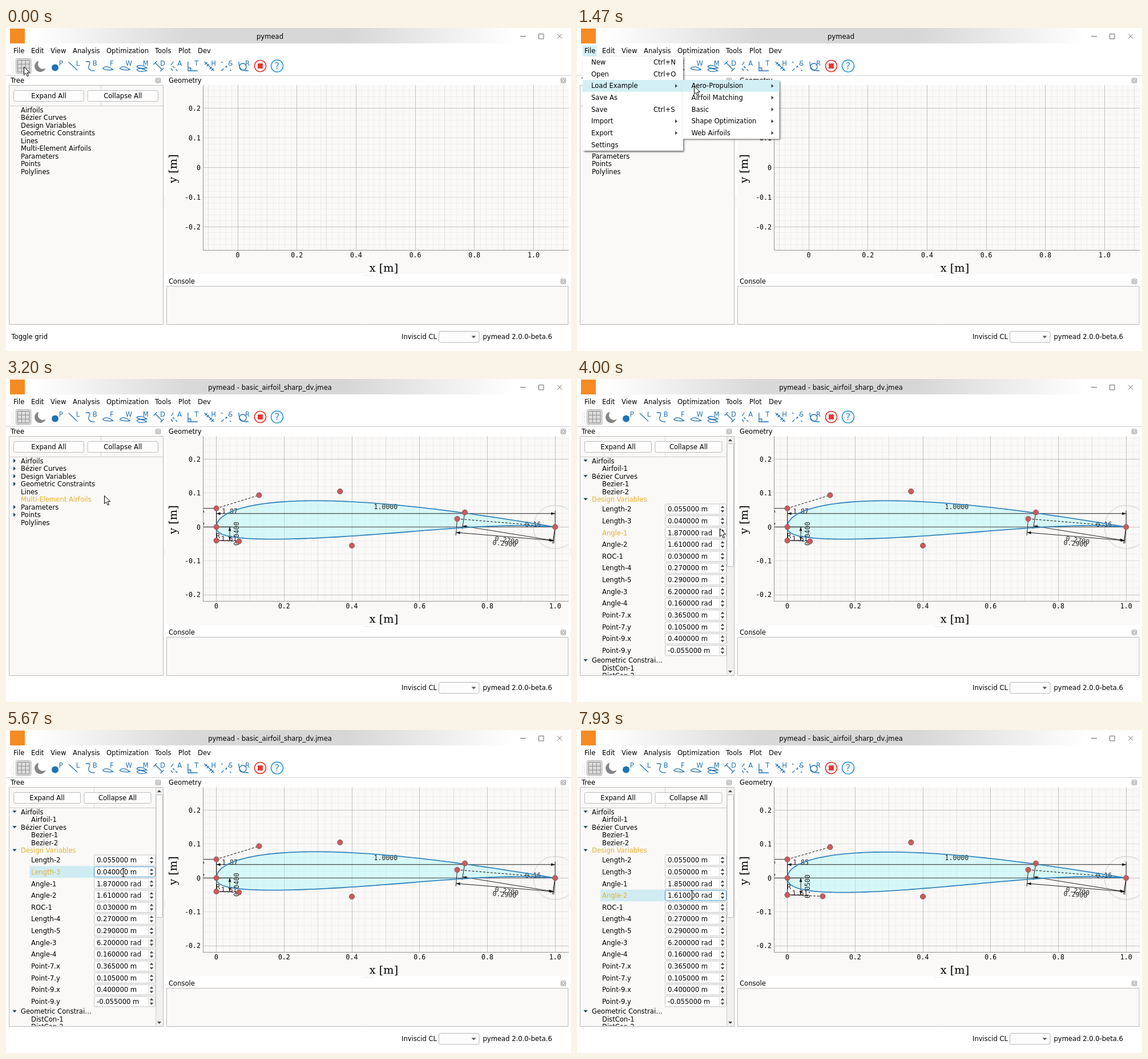
Write an HTML page with a canvas that moves like this. It is 990x566 px and loops after 8 s.

```html
<!DOCTYPE html>
<html lang="en">
<head>
<meta charset="utf-8">
<title>pymead</title>
<style>
html, body { margin: 0; width: 100%; height: 100%; overflow: hidden; background: #fff; }
canvas { display: block; }
</style>
</head>
<body>
<canvas id="c" width="990" height="566"></canvas>
<script>
const g = document.getElementById('c').getContext('2d');
const LOOP = 8000, STEP = 1000 / 15, PITCH = 20.65, ROW = 13.5;
const SANS = '11.57px "DejaVu Sans", sans-serif';
const MONO = '11.57px "DejaVu Sans Mono", monospace';
const SERIF = '19.3px "DejaVu Serif", "Noto Serif", serif';
const INK = '#000', BG = '#faf9f8', EDGE = '#b9b8b6', HOT = '#e8b02e', SEL = '#d2eff6', BLUE = '#1f72b8';

// pointer path: time, x, y
const PATH = [
  [0, 31, 68], [330, 21, 42], [470, 21, 42], [800, 46, 93], [870, 46, 92], [1000, 46, 92],
  [1270, 150, 99], [1470, 205, 102], [1730, 258, 160], [1800, 270, 157], [1870, 278, 150],
  [1930, 281, 148], [2000, 281, 160], [2200, 280, 161], [2600, 420, 163], [2670, 420, 163],
  [3000, 225, 195], [3200, 172, 204.5], [3470, 80, 119], [3540, 80, 119], [3870, 246, 258],
  [4000, 250, 262], [4400, 252, 222], [5070, 252, 222], [5200, 252, 230], [5330, 252, 230],
  [5600, 205, 250], [5734, 205, 250], [5867, 250, 243], [6467, 250, 243], [6600, 251, 252],
  [6670, 251, 252], [6870, 251, 272], [7400, 251, 272], [7600, 250, 280.5], [7867, 250, 280.5],
  [7930, 201, 289], [8000, 201, 289]
];

function pointer(t) {
  let i = 1;
  while (i < PATH.length - 1 && PATH[i][0] < t) i++;
  const a = PATH[i - 1], b = PATH[i];
  const k = Math.min(1, Math.max(0, (t - a[0]) / (b[0] - a[0])));
  const e = k * k * (3 - 2 * k);
  return { x: a[1] + (b[1] - a[1]) * e, y: a[2] + (b[2] - a[2]) * e };
}

// last value whose start time has passed
function at(t, first, ...keys) {
  let v = first;
  for (const [s, n] of keys) if (t >= s) v = n;
  return v;
}

function text(s, x, y, o = {}) {
  g.font = o.font || SANS;
  g.fillStyle = o.color || INK;
  g.textAlign = o.align || 'left';
  g.fillText(s, x, y + (o.dy ?? 4.2));
}
function line(x1, y1, x2, y2, color = INK, w = 1, dash = []) {
  g.strokeStyle = color; g.lineWidth = w; g.setLineDash(dash);
  g.beginPath(); g.moveTo(x1, y1); g.lineTo(x2, y2); g.stroke();
  g.setLineDash([]);
}
function rect(x, y, w, h, fill, stroke, r = 0) {
  g.beginPath(); g.roundRect(x, y, w, h, r);
  if (fill) { g.fillStyle = fill; g.fill(); }
  if (stroke) { g.strokeStyle = stroke; g.lineWidth = 1; g.stroke(); }
}
function poly(pts, fill) {
  g.fillStyle = fill; g.beginPath();
  pts.forEach(p => g.lineTo(p[0], p[1]));
  g.closePath(); g.fill();
}
function circle(x, y, r, fill, stroke, w = 1) {
  g.beginPath(); g.arc(x, y, r, 0, 7);
  if (fill) { g.fillStyle = fill; g.fill(); }
  if (stroke) { g.strokeStyle = stroke; g.lineWidth = w; g.stroke(); }
}
const right = (x, y, c = '#444', s = 3.3) => poly([[x - 2, y - s], [x + 2, y], [x - 2, y + s]], c);
const down = (x, y, c = '#444', s = 3.5, h = 2) => poly([[x - s, y - h], [x + s, y - h], [x, y + h]], c);
const up = (x, y, c = '#444', s = 3.5, h = 2) => poly([[x - s, y + h], [x + s, y + h], [x, y - h]], c);
function dots(x, y, nx, ny, gap = 3) {
  g.fillStyle = '#c4c4c4';
  for (let i = 0; i < nx; i++) for (let j = 0; j < ny; j++) g.fillRect(x + i * gap, y + j * gap, 1, 1);
}
function button(s, x, y, w, h) {
  rect(x, y, w, h, '#fdfdfd', '#bcbbba', 2.5);
  text(s, x + w / 2, y + h / 2, { align: 'center' });
}

function titleBar(loaded) {
  const grad = g.createLinearGradient(0, 0, 990, 0);
  [[0.05, '#fff'], [0.32, '#d9d9d9'], [0.6, '#d6d6d6'], [0.9, '#fff']].forEach(s => grad.addColorStop(...s));
  g.fillStyle = grad; g.fillRect(0, 0, 990, 27);
  rect(7, 1, 26, 26, '#f58b22');
  text(loaded ? 'pymead - basic_airfoil_sharp_dv.jmea' : 'pymead', 462.5, 14.5, { align: 'center' });
  line(901, 14.5, 911, 14.5, '#666');
  rect(933.5, 10.5, 8.5, 8.5, null, '#666');
  line(966, 10.5, 974, 18.5, '#666');
  line(974, 10.5, 966, 18.5, '#666');
}

const MENU = [['File', 13], ['Edit', 44], ['View', 78], ['Analysis', 117], ['Optimization', 176], ['Tools', 261], ['Plot', 302], ['Dev', 336]];
function menuBar(fileHot) {
  if (fileHot) rect(10, 31, 25, 18, SEL);
  MENU.forEach(m => text(m[0], m[1], 40));
}

// each icon: letter, then strokes relative to its centre
const FOIL = 'M-9 4C-6-1 2 0 9 6C2 7-4 7-9 4';
const ICONS = [
  ['P', ''], ['L', 'M-9-7L6 7'], ['B', 'M-9-8C6-10-8 0-3 5S4 7 7 8'], ['F', FOIL],
  ['W', FOIL], ['M', 'M-9 1C-6-3 2-2 9 3C2 4-4 4-9 1M-9 6C-5 3 2 3 9 8C2 10-5 10-9 6'],
  ['D', 'M-6-6L6 6M-9-3L-3-9M3 9L9 3'], ['A', 'M-8-2L-4-8M-5 0L-2 3M0 5L3 8M-8 4L-5 8'],
  ['T', 'M-8-8V8H9M-8 3H-3V8'], ['H', 'M-9-8L8 8M-8-3L-4-7M-5 0L-1-4M0 5L4 1M3 8L7 4'],
  ['S', 'M-9 8L-5 4M-2 2L1-1M3-3L5-5M-9-8L-7-6M-1 0L1 2M6 6L8 8'],
  ['R', 'M5 1A6 6 0 1 1-7 1A6 6 0 1 1 5 1M-8-8C-8 4-5 8 9 8']
];
function toolBar() {
  dots(9, 59, 2, 7);
  rect(17.5, 53.5, 26.5, 26.5, '#dedddd', '#b5b4b4', 2.5);
  rect(20.5, 56.5, 20.5, 20.5, null, '#858585');
  for (const d of [6.8, 13.7]) {
    line(20.5 + d, 56.5, 20.5 + d, 77, '#8d8d8d');
    line(20.5, 56.5 + d, 41, 56.5 + d, '#8d8d8d');
  }
  g.fillStyle = '#858585'; g.beginPath();
  g.arc(60, 67, 10, -1.9, 0.35, true);
  g.arc(64.5, 63.5, 8.4, 0.9, -2.75);
  g.fill();
  circle(86, 69.5, 6, BLUE);
  ICONS.forEach(([s, d], i) => {
    const x = 89.3 + i * 29.7;
    text(s, x + 7, 61.5, { color: BLUE, align: 'center' });
    g.save(); g.translate(x, 67);
    g.strokeStyle = BLUE; g.lineWidth = 1.3; g.stroke(new Path2D(d));
    g.restore();
  });
  circle(445.5, 66.5, 10, '#fff', '#e23b35', 1.6);
  rect(441, 62, 9, 9, '#e23b35', null, 1);
  circle(475, 66.5, 10.5, '#fff', '#2590d6', 1.5);
  text('?', 475, 66.5, { align: 'center', color: '#2590d6', font: '16px "DejaVu Sans", sans-serif', dy: 5.8 });
  line(0, 83.5, 990, 83.5, '#cfcecd');
}

function dock(s, x, y, bx) {
  text(s, x, y);
  rect(bx + 0.5, y - 4, 8, 8, null, '#8c8c8c', 1);
  rect(bx + 2.5, y - 1.5, 4, 3.5, null, '#8c8c8c');
}

const GROUPS = ['Airfoils', 'Bézier Curves', 'Design Variables', 'Geometric Constraints', 'Lines', 'Multi-Element Airfoils', 'Parameters', 'Points', 'Polylines'];
const ARROWED = [0, 1, 2, 3, 6, 7];

function collapsed(loaded, p) {
  line(166.5, 101, 166.5, 136, '#d4d3d2');
  line(5, 136.5, 275, 136.5, '#cccbca');
  button('Expand All', 13.5, 109.5, 123, 19);
  button('Collapse All', 143, 109.5, 123.5, 19);
  const hover = loaded && p.x < 275 ? Math.floor((p.y - 136.2) / ROW) : -1;
  GROUPS.forEach((s, i) => {
    const y = 143.3 + i * ROW;
    if (loaded && ARROWED.includes(i)) right(15, y, '#0f4560', 3.6);
    text(s, 26, y, { color: i === hover ? HOT : INK });
  });
}

function variables(t) {
  const f = (v, u = 'm') => v.toFixed(6) + ' ' + u;
  const s = shape(t);
  return [
    ['Length-2', f(s.l2)], ['Length-3', f(s.l3)], ['Angle-1', f(s.a1, 'rad')], ['Angle-2', f(1.61, 'rad')],
    ['ROC-1', f(0.03)], ['Length-4', f(0.27)], ['Length-5', f(0.29)], ['Angle-3', f(6.2, 'rad')],
    ['Angle-4', f(0.16, 'rad')], ['Point-7.x', f(0.365)], ['Point-7.y', f(0.105)], ['Point-9.x', f(0.4)], ['Point-9.y', f(-0.055)]
  ];
}

function expanded(t, p) {
  const group = (s, y, c) => { down(15, y, '#0f4560', 3.6); text(s, 26, y, { color: c }); };
  const focus = at(t, -1, [4470, 0], [5660, 1], [7000, 2], [7730, 3]);
  const hover = p.x < 262 ? Math.floor((p.y - 217.7) / PITCH) : -1;
  line(154.5, 101, 154.5, 136, '#d4d3d2');
  line(5, 136.5, 262, 136.5, '#cccbca');
  button('Expand All', 13.5, 109.5, 117, 19);
  button('Collapse All', 137, 109.5, 117, 19);
  g.save();
  g.beginPath(); g.rect(6, 101, 269, 417.5); g.clip();
  group('Airfoils', 143.3);
  text('Airfoil-1', 44, 156.8);
  group('Bézier Curves', 170.3);
  text('Bezier-1', 44, 183.8);
  text('Bezier-2', 44, 197.3);
  group('Design Variables', 210.8, HOT);
  variables(t).forEach(([s, v], i) => {
    const y = 228 + i * PITCH, on = i === focus;
    if (on) rect(41, y - 10.3, 114, PITCH, '#d0ecf3');
    text(s, 44, y, { color: on || i === hover ? HOT : INK });
    rect(154.5, y - 9, 107, 18, '#fff', on ? '#3b8fca' : '#c3c2c1', 2);
    line(249.5, y - 8, 249.5, y + 8, '#dcdbda');
    text(v, 159, y);
    up(255, y - 4, '#4a4a4a', 3.4);
    down(255, y + 4, '#4a4a4a', 3.4);
  });
  group('Geometric Constrai…', 493);
  text('DistCon-1', 44, 506.5);
  text('DistCon-2', 44, 520);
  rect(262.5, 101, 12, 418, '#f1f0ef');
  line(262.5, 101, 262.5, 519, '#cfcecd');
  rect(263, 113.5, 11.5, 215, '#fbfafa', '#bdbcbb', 1);
  up(268.5, 107); down(268.5, 513);
  g.restore();
}

function tree(t, p) {
  dock('Tree', 8, 92, 262);
  rect(5.5, 100.5, 270, 419, BG, EDGE);
  if (t >= 3530) expanded(t, p); else collapsed(t >= 2670, p);
}

function shape(t) {
  return {
    l2: at(t, 0.055, [4860, 0.065], [5060, 0.075], [5190, 0.065], [5330, 0.055]),
    l3: at(t, 0.04, [5930, 0.05], [6190, 0.06], [6600, 0.05]),
    a1: at(t, 1.87, [7060, 1.86], [7395, 1.85])
  };
}

// distance dimension drawn at an offset to the left-hand side of a-b on screen
function dim(a, b, off, s) {
  const dx = b[0] - a[0], dy = b[1] - a[1], n = Math.hypot(dx, dy);
  const ux = dx / n, uy = dy / n, nx = -uy, ny = ux;
  const move = (p, d) => [p[0] + nx * d, p[1] + ny * d];
  const c = move(a, off), d = move(b, off), ext = off * 1.22;
  line(...a, ...move(a, ext), '#222'); line(...b, ...move(b, ext), '#222');
  line(...c, ...d, '#222');
  for (const [q, k] of [[c, 1], [d, -1]]) {
    const bx = q[0] + ux * 7 * k, by = q[1] + uy * 7 * k;
    poly([q, [bx + nx * 2.4, by + ny * 2.4], [bx - nx * 2.4, by - ny * 2.4]], '#111');
  }
  const m = move([(a[0] + b[0]) / 2, (a[1] + b[1]) / 2], off + 12 * Math.sign(off));
  g.save(); g.translate(...m); g.rotate(Math.atan2(dy, dx));
  text(s, 0, 0, { font: MONO, align: 'center', color: '#222' });
  g.restore();
}

function bezier(P) {
  const out = [];
  for (let i = 0; i <= 90; i++) {
    let q = P;
    const u = i / 90;
    while (q.length > 1) q = q.slice(1).map((b, j) => [0, 1].map(k => q[j][k] * (1 - u) + b[k] * u));
    out.push(q[0]);
  }
  return out;
}

function airfoil(t, X, Y) {
  const { l2, l3, a1 } = shape(t), TE = 2 * Math.PI - 6.2;
  const side = (l, ang, sg, far, near) => {
    const x = l * l / 0.03 * 1.25;
    return [[0, 0], [0, sg * l], [x, sg * (l + x * Math.tan(ang - Math.PI / 2))], far, near, [1, 0]].map(p => [X(p[0]), Y(p[1])]);
  };
  const U = side(l2, a1, 1, [0.365, 0.105], [1 - 0.27 * Math.cos(0.16), 0.27 * Math.sin(0.16)]);
  const L = side(l3, 1.61, -1, [0.4, -0.055], [1 - 0.29 * Math.cos(TE), 0.29 * Math.sin(TE)]);
  const cu = bezier(U), cl = bezier(L), O = U[0], E = U[5];

  poly([...cu, ...cl.slice().reverse()], 'rgba(170,245,245,0.45)');
  circle(...E, 38, null, '#c9c9c9', 0.9);
  line(...O, ...E, '#444');
  line(...U[1], ...L[1], '#333', 1.2);
  line(...U[1], ...U[2], '#111', 1, [4, 2.5]);
  line(...L[1], ...L[2], '#111', 1, [4, 2.5]);
  line(...L[4], ...E, '#111', 1, [4, 2.5]);
  dim(O, E, -23.5, '1.0000');
  dim(O, U[1], -23.5, l2.toFixed(4));
  dim(L[1], O, 23.5, l3.toFixed(4));
  dim(U[4], E, 24, '0.2700');
  dim(L[4], E, 24, '0.2900');
  const mid = { font: MONO, align: 'center', color: '#222' };
  text(a1.toFixed(2), U[1][0] + 23.5, U[1][1] + 5, mid);
  text('1.61', L[1][0] + 22, L[1][1] - 3.5, mid);
  text('0.16', 923.5, 254.5, mid);
  text('R', 371.5, 275, mid);
  for (const c of [cu, cl]) {
    g.beginPath(); c.forEach(p => g.lineTo(p[0], p[1]));
    g.strokeStyle = '#3787be'; g.lineWidth = 1.8; g.stroke();
  }
  for (const p of [...U, ...L.slice(1, 5)]) circle(...p, 4.6, '#cb5a5a', '#8b5a5a');
}

function plot(t) {
  const loaded = t >= 2670;
  const k = loaded ? 593.6 : 518.5, x0 = loaded ? 368.6 : 406, y0 = loaded ? 259.3 : 244.6;
  const X = v => x0 + v * k, Y = v => y0 - v * k;
  dock('Geometry', 285, 92, 972);
  rect(281, 100, 705, 331, BG);
  g.save();
  g.beginPath(); g.rect(345, 100, 641, 289.5); g.clip();
  const levels = [['#efeeed', n => n % 5], ['#dfdedd', n => n % 5 === 0 && n % 10], ['#c2c1c0', n => n % 10 === 0]];
  for (const [color, match] of levels) {
    for (let n = -20; n < 60; n++) {
      if (!match(n)) continue;
      const x = Math.floor(X(n / 50)) + 0.5, y = Math.floor(Y(n / 50)) + 0.5;
      line(x, 100, x, 389, color);
      line(345, y, 986, y, color);
    }
  }
  if (loaded) airfoil(t, X, Y);
  g.restore();
  line(345.5, 100, 345.5, 389.5, '#969594');
  line(345, 389.5, 986, 389.5, '#969594');
  const num = v => v === 0 ? '0' : v.toFixed(1);
  for (let i = 0; i <= 5; i++) text(num(i / 5), X(i / 5), 397.5, { font: MONO, align: 'center' });
  for (let i = -2; i <= 2; i++) text(num(i / 10), 341, Y(i / 10), { font: MONO, align: 'right' });
  text('x [m]', 662, 421, { font: SERIF, align: 'center', dy: 6 });
  g.save(); g.translate(293, 246.5); g.rotate(-Math.PI / 2);
  text('y [m]', 0, 0, { font: SERIF, align: 'center', dy: 6 });
  g.restore();
  dots(278, 297, 1, 6); dots(988, 297, 1, 6); dots(627, 433, 6, 1);
}

function footer(t) {
  dock('Console', 285, 444, 972);
  rect(281.5, 452.5, 703.5, 67, BG, EDGE);
  if (t < 130) text('Toggle grid', 9.5, 541);
  text('Inviscid CL', 693, 541);
  rect(758.5, 531.5, 70.5, 19.5, '#fcfcfc', '#b6b5b4', 2.5);
  down(819.5, 541.5, '#555', 4);
  text('pymead 2.0.0-beta.6', 835.5, 541);
}

function popup(x, y, w, items, hot) {
  const h = items.length * PITCH;
  g.save();
  g.shadowColor = 'rgba(0,0,0,0.6)'; g.shadowBlur = 3; g.shadowOffsetX = g.shadowOffsetY = 1.5;
  rect(x, y, w, h, '#fff');
  g.restore();
  items.forEach(([s, tail], i) => {
    const cy = y + (i + 0.5) * PITCH;
    if (i === hot) rect(x, cy - PITCH / 2, w, PITCH, SEL);
    text(s, x + 15, cy - 0.3);
    if (tail === '>') right(x + w - 12, cy);
    else if (tail) text(tail, x + 124, cy - 0.3);
  });
}
const FILE = [['New', 'Ctrl+N'], ['Open', 'Ctrl+O'], ['Load Example', '>'], ['Save As'], ['Save', 'Ctrl+S'], ['Import', '>'], ['Export', '>'], ['Settings']];
const EXAMPLES = [['Aero-Propulsion', '>'], ['Airfoil Matching', '>'], ['Basic', '>'], ['Shape Optimization', '>'], ['Web Airfoils', '>']];
function menus(t, p) {
  if (t < 470 || t >= 2670) return;
  const sub = t >= 1130, leaf = t >= 1730;
  popup(10, 49.8, 176, FILE, sub ? 2 : Math.floor((p.y - 49.8) / PITCH));
  if (sub) popup(185.5, 91.1, 169, EXAMPLES, p.x > 186 ? Math.floor((p.y - 91.1) / PITCH) : -1);
  if (leaf) popup(354.5, 153, 179, [['Single Airfoil (Sharp TE)']], p.x > 354 ? 0 : -1);
}

const ARROW = new Path2D('M0 0V14L3.2 11L5.7 16.6L8 15.6L5.6 10.2H10Z');
const IBEAM = new Path2D('M-2.5-7.5H-.5L0-7L.5-7.5H2.5M0-7V7M-2.5 7.5H-.5L0 7L.5 7.5H2.5');
function cursor(t, p) {
  const inField = t > 3530 && p.x > 155 && p.x < 248 && p.y > 218;
  g.save(); g.translate(p.x + 0.5, p.y);
  g.lineJoin = 'round';
  if (inField) {
    g.strokeStyle = '#fff'; g.lineWidth = 2.6; g.stroke(IBEAM);
    g.strokeStyle = '#000'; g.lineWidth = 1.1; g.stroke(IBEAM);
  } else {
    g.fillStyle = '#fff'; g.fill(ARROW);
    g.strokeStyle = '#000'; g.lineWidth = 1; g.stroke(ARROW);
  }
  g.restore();
}

function draw(now) {
  const t = Math.floor((now % LOOP + 5) / STEP) * STEP;
  const p = pointer(t);
  g.fillStyle = '#fff'; g.fillRect(0, 0, 990, 566);
  titleBar(t >= 2670);
  menuBar(t > 260 && t < 2670);
  toolBar();
  tree(t, p);
  plot(t);
  footer(t);
  menus(t, p);
  cursor(t, p);
}

const start = performance.now();
function tick() {
  draw(performance.now() - start);
  requestAnimationFrame(tick);
}
tick();
</script>
</body>
</html>
```
